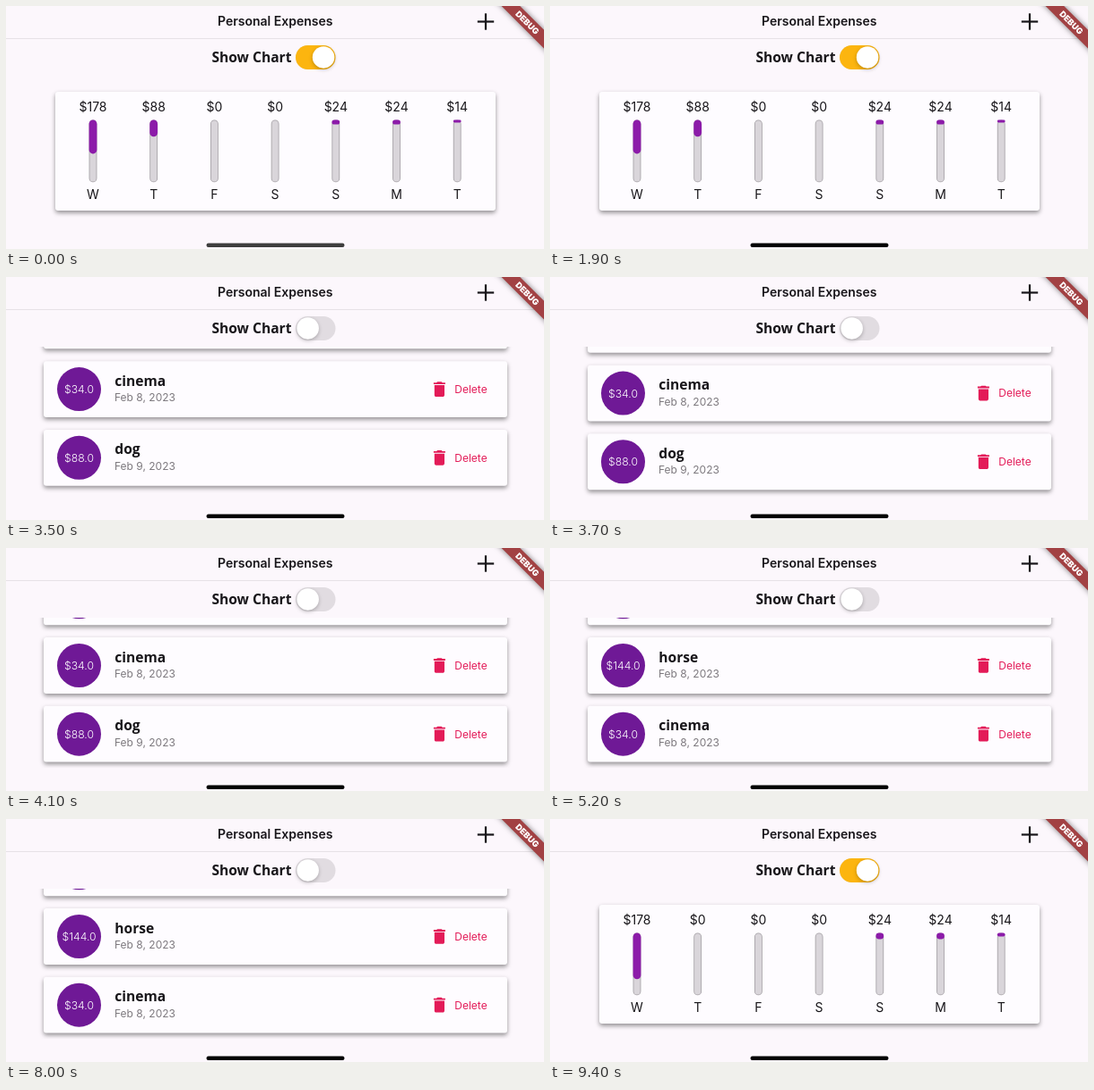
Animation of 600x272 px, one loop 9.5 s. Source, as an HTML page with a canvas:

```html
<!DOCTYPE html>
<html lang="en">
<head>
<meta charset="utf-8">
<title>Personal Expenses</title>
<style>
  html, body { margin: 0; width: 100%; height: 100%; overflow: hidden; background: #fcf7fc; }
  canvas { display: block; width: 600px; height: 272px; }
</style>
</head>
<body>
<canvas id="stage" width="600" height="272"></canvas>
<script>
const ctx = document.getElementById('stage').getContext('2d');

const LOOP = 9500;
const HIDE_CHART = 2500, SHOW_CHART = 8500, REMOVE = 4800;
const PITCH = 76.7, LAST_MID = 208.2, VIEW = 168.3;
const UI = 'Inter, Roboto, sans-serif';
const HEAD = '"Open Sans", "Noto Sans", sans-serif';
const INK = '#18161a', BG = '#fcf7fc', PINK = '#e31b58';

const expenses = [
  ['bread', 14, 14], ['shoes', 24, 13], ['lunch', 24, 12],
  ['horse', 144, 8], ['cinema', 34, 8], ['dog', 88, 9]
].map(([name, cost, day]) => ({ name, cost, day }));
const week = ['W', 'T', 'F', 'S', 'S', 'M', 'T'];
const trash = new Path2D('M6 19c0 1.1.9 2 2 2h8c1.1 0 2-.9 2-2V7H6v12zM19 4h-3.5l-1-1h-5l-1 1H5v2h14V4z');

const clamp = v => Math.max(0, Math.min(1, v));
const smooth = v => v * v * (3 - 2 * v);
const span = (t, a, b) => smooth(clamp((t - a) / (b - a)));

function text(str, x, y, font, color, align = 'left') {
  ctx.font = font;
  ctx.fillStyle = color;
  ctx.textAlign = align;
  ctx.fillText(str, x, y);
}

function pill(x, y, w, h, r, color) {
  ctx.beginPath();
  ctx.roundRect(x, y, w, h, Math.min(r, w / 2, h / 2));
  ctx.fillStyle = color;
  ctx.fill();
}

function disc(x, y, r, color) {
  pill(x - r, y - r, 2 * r, 2 * r, r, color);
}

function shaded(color, blur, dy, paint) {
  ctx.save();
  ctx.shadowColor = color;
  ctx.shadowBlur = blur;
  ctx.shadowOffsetY = dy;
  paint();
  ctx.restore();
}

function card(x, y, w, h) {
  shaded('rgba(0,0,0,.42)', 5, 2.5, () => pill(x, y, w, h, 3, '#fefcff'));
}

function drawChart(items) {
  card(55, 96, 491, 133);
  const total = items.reduce((sum, e) => sum + e.cost, 0);
  week.forEach((label, i) => {
    const x = 97 + 67.7 * i;
    const sum = items.filter(e => e.day === 8 + i).reduce((s, e) => s + e.cost, 0);
    text('$' + sum, x, 118, `14px ${UI}`, INK, 'center');
    pill(x - 4.4, 127.5, 8.8, 69.8, 4.4, '#a29ea3');
    pill(x - 3.6, 128.3, 7.2, 68.2, 3.6, '#d9d5da');
    if (sum) pill(x - 4.4, 127.5, 8.8, 69.8 * sum / total, 4.4, '#8c1ba9');
    text(label, x, 216, `14px ${UI}`, INK, 'center');
  });
}

function drawRow(item, mid) {
  card(42, mid - 31.4, 517, 62.8);
  disc(81.5, mid, 24.5, '#6f1996');
  text(`$${item.cost}.0`, 81.5, mid + 4.6, `300 12.2px ${UI}`, '#fff', 'center');
  text(item.name, 121.3, mid - 4, `bold 15.6px ${HEAD}`, INK);
  text(`Feb ${item.day}, 2023`, 121, mid + 13.5, `12px ${UI}`, '#7d797e');
  ctx.save();
  ctx.translate(483.4, mid);
  ctx.scale(0.93, 0.93);
  ctx.translate(-12, -12);
  ctx.fillStyle = PINK;
  ctx.fill(trash);
  ctx.restore();
  text('Delete', 500.3, mid + 4.4, `12px ${UI}`, PINK);
}

// Distance past the end of the list: fling from the top, then spring back.
function overscroll(t, count) {
  const start = VIEW - count * PITCH, peak = 24;
  if (t < 3300) {
    const p = clamp((t - 2900) / 400);
    return start + (peak - start) * (1 - (1 - p) ** 2) * (0.4 + 0.6 * p);
  }
  return t < 4100 ? peak * Math.exp(-7 * (t - 3300) / 1000) : 0;
}

function drawList(items, t) {
  ctx.save();
  ctx.beginPath();
  ctx.rect(0, 78, 600, VIEW);
  ctx.clip();
  const over = overscroll(t, items.length);
  items.forEach((item, i) => {
    const mid = LAST_MID - (items.length - 1 - i) * PITCH - over;
    if (mid > 40 && mid < 290) drawRow(item, mid);
  });
  ctx.restore();
}

function drawSwitch(t) {
  const on = 1 - span(t, HIDE_CHART, HIDE_CHART + 200) + span(t, SHOW_CHART, SHOW_CHART + 200);
  const press = at => span(t, at - 140, at) - span(t, at, at + 200);
  const extra = 4 * (press(HIDE_CHART) + press(SHOW_CHART));
  pill(323, 44, 44.5, 27, 13.5, '#e1dce1');
  ctx.globalAlpha = on;
  pill(323, 44, 44.5, 27, 13.5, '#fcb50f');
  ctx.globalAlpha = 1;
  const left = 324.4 + (17.4 - extra) * on;
  shaded('rgba(0,0,0,.25)', 4, 1.5, () => pill(left, 45.2, 24.5 + extra, 24.5, 12.3, '#fff'));
}

function drawBanner() {
  ctx.save();
  ctx.translate(600, 0);
  ctx.rotate(Math.PI / 4);
  shaded('rgba(0,0,0,.5)', 6, 0, () => {
    ctx.fillStyle = '#a24143';
    ctx.fillRect(-50, 19, 100, 14.5);
  });
  text('DEBUG', 0, 29.7, `900 9.4px ${UI}`, '#fff', 'center');
  ctx.restore();
}

function draw(t) {
  ctx.fillStyle = BG;
  ctx.fillRect(0, 0, 600, 272);

  const items = t < REMOVE ? expenses : expenses.slice(0, -1);
  if (t < HIDE_CHART || t >= SHOW_CHART) drawChart(items);
  else drawList(items, t);

  ctx.fillStyle = '#e6e1e6';
  ctx.fillRect(0, 36, 600, 1);
  text('Personal Expenses', 300.2, 22, `600 14px ${UI}`, INK, 'center');
  ctx.fillStyle = INK;
  ctx.fillRect(525.8, 16.4, 18.4, 2.2);
  ctx.fillRect(533.9, 8.3, 2.2, 18.4);

  text('Show Chart', 229.4, 63, `bold 15.6px ${HEAD}`, INK);
  drawSwitch(t);

  const grey = Math.round(62 * (1 - clamp(t / 300)));
  pill(223.5, 265.5, 154, 4.4, 2.2, `rgb(${grey},${grey},${grey})`);
  drawBanner();
}

const begin = performance.now();
function tick() {
  draw((performance.now() - begin) % LOOP);
  requestAnimationFrame(tick);
}
tick();
</script>
</body>
</html>
```
